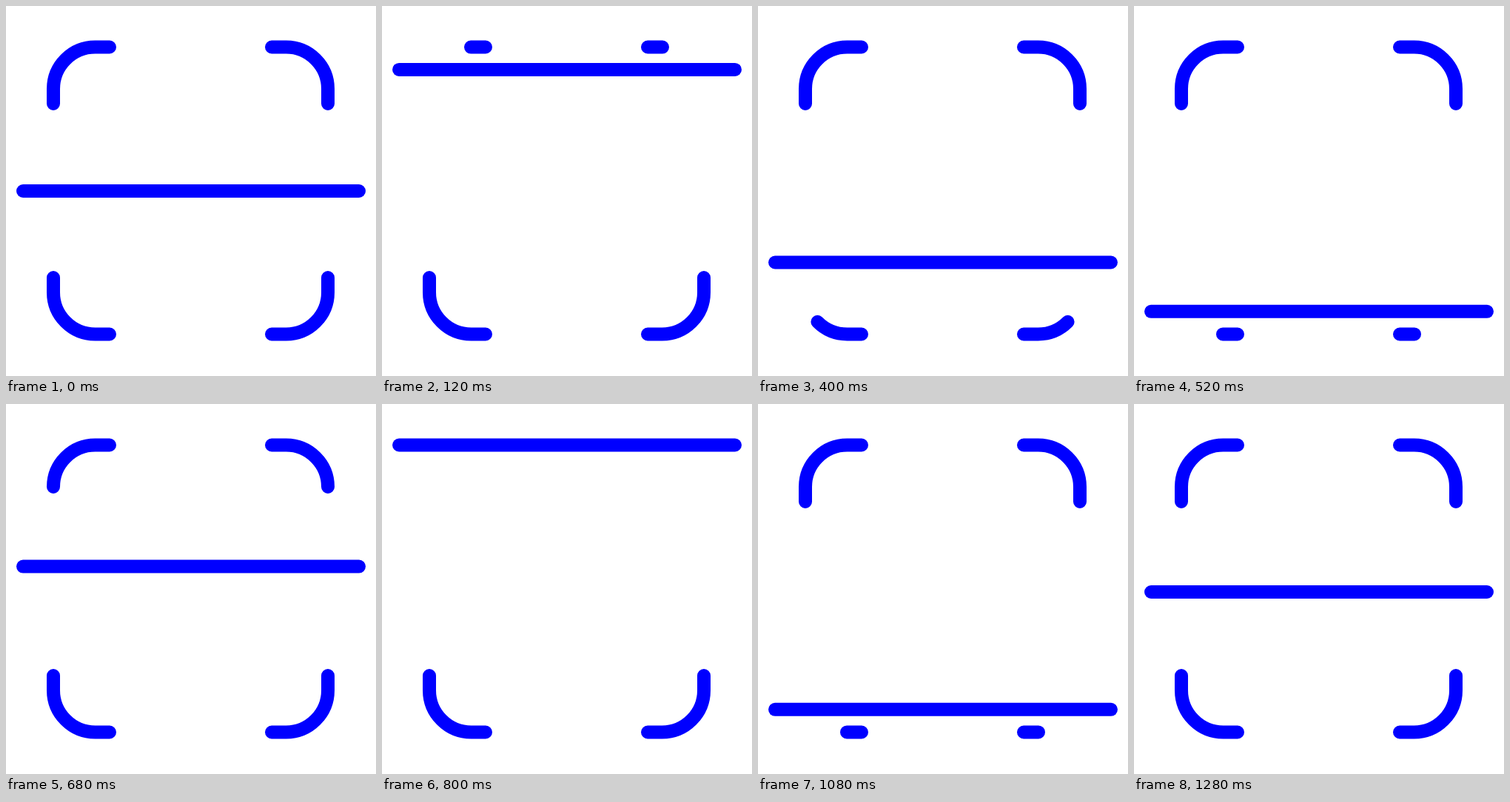
Recreate the animation shown at these times as an HTML page. Size 500 by 500 pixels, loop 1920 ms.

```html
<!DOCTYPE html>
<html lang="en">
<head>
<meta charset="utf-8">
<title>Scanner</title>
<style>
  html, body { margin: 0; width: 100%; height: 100%; overflow: hidden; background: #fff; }
  svg { display: block; width: 100%; height: 100%; fill: none; stroke: #00f; stroke-width: 18; stroke-linecap: round; }
</style>
</head>
<body>
<svg viewBox="0 0 500 500">
  <defs>
    <path id="corner" pathLength="1" d="M140 55.5H120.5A56.5 56.5 0 0 0 64 112V132"/>
    <g id="pair">
      <use href="#corner"/>
      <use href="#corner" transform="matrix(-1 0 0 1 499 0)"/>
    </g>
  </defs>
  <use id="top" href="#pair"/>
  <use id="bottom" href="#pair" transform="matrix(1 0 0 -1 0 499)"/>
  <path id="beam" d="M23 0H477"/>
</svg>
<script>
const LOOP = 1920, STEP = 40, SWEEP = 160, END = 1280;
const MIDDLE = 250, TOP = 55.5, BOTTOM = 443, REST = 254;
const [topPair, bottomPair, beam] = ['top', 'bottom', 'beam'].map(id => document.getElementById(id));

const ease = u => u * u * (3 - 2 * u);
const mix = (a, b, u) => a + (b - a) * u;

// Erase a pair of corners from their vertical ends inwards.
function trim(pair, amount) {
  pair.style.strokeDasharray = amount > 0 ? `${1 - amount} 2` : 'none';
  pair.style.visibility = amount < 1 ? 'visible' : 'hidden';
}

function draw(now) {
  const time = Math.min(Math.floor(now % LOOP / STEP) * STEP, END);
  // Four eased sweeps per cycle: up, back, down, back.
  const sweep = Math.floor(time / SWEEP) % 4;
  const u = ease(time % SWEEP / SWEEP);
  const reach = sweep % 2 ? 1 - u : u;
  const upper = sweep < 2 && time < END;
  const home = time > END - SWEEP ? REST : MIDDLE;

  const y = mix(home, upper ? TOP : BOTTOM, reach);
  beam.setAttribute('transform', `translate(0 ${y})`);
  trim(topPair, upper ? reach : 0);
  trim(bottomPair, upper ? 0 : reach);
}

const start = performance.now();
function frame() {
  draw(performance.now() - start);
  requestAnimationFrame(frame);
}
frame();
</script>
</body>
</html>
```
